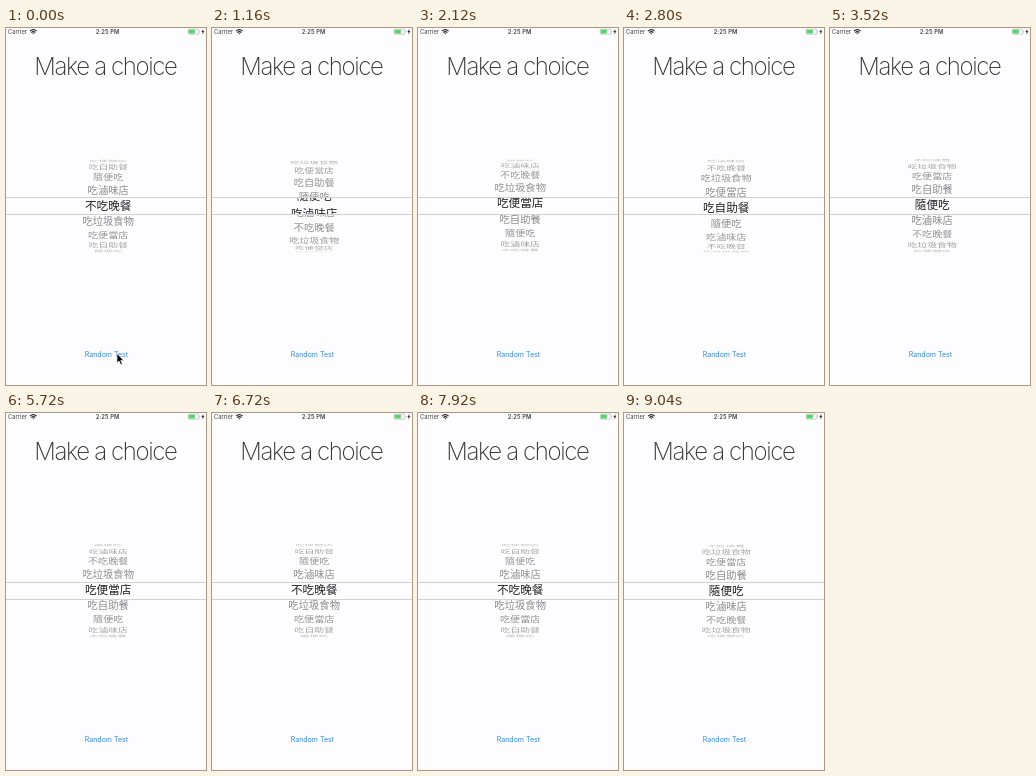
Animation, 200 px wide and 357 px high, one loop 9.6 s. Source, as an HTML page:

```html
<!DOCTYPE html>
<html lang="zh-Hant">
<head>
<meta charset="utf-8">
<title>Make a choice</title>
<style>
  html, body { margin: 0; width: 100%; height: 100%; overflow: hidden; background: #fdfcfe; }
  svg { display: block; width: 100vw; height: 100vh; }
  text { text-anchor: middle; font-family: Inter, sans-serif; }
  .row { font: 300 10.4px "Noto Sans CJK TC", "Noto Sans CJK", sans-serif; }
</style>
</head>
<body>
<svg viewBox="0 0 200 357">
  <defs>
    <clipPath id="outside"><path d="M0 131H200V169H0zM0 187H200V225H0z"/></clipPath>
    <clipPath id="inside"><path d="M0 170H200V186H0z"/></clipPath>
  </defs>

  <g fill="#444" font-size="5.8">
    <text x="11.5" y="6.2">Carrier</text>
    <text x="101.6" y="6.2" font-weight="600" letter-spacing=".1">2:25 PM</text>
  </g>
  <g fill="none" stroke="#222" stroke-width="1.1">
    <path d="M24 3.2Q27.3 0 30.6 3.2M25.3 4.6Q27.3 2.6 29.3 4.6"/>
    <path d="M26.3 5.2h2l-1 1.2z" fill="#222" stroke="none"/>
  </g>
  <rect x="182.2" y="1.2" width="10.8" height="5" rx="1" fill="none" stroke="#999" stroke-width=".5"/>
  <rect x="182.8" y="1.8" width="6" height="3.8" rx=".5" fill="#4cd964"/>
  <path d="M193.6 2.8v1.8q1-.9 0-1.8" fill="#999"/>
  <path d="M197.6 1l-2.3 3.1h1.4l-.6 2.5 2.4-3.3h-1.4z" fill="#222"/>

  <text x="99.4" y="46.5" font-size="24" font-weight="200" letter-spacing="-1.35" fill="#333">Make a choice</text>

  <g id="wheel" clip-path="url(#outside)"></g>
  <g id="lens" clip-path="url(#inside)" fill="#222"></g>
  <path d="M0 169.5H200M0 186.5H200" stroke="#d2d2d2"/>

  <text x="100.4" y="328.5" font-size="7" fill="#2b8af5">Random Test</text>
  <path id="cursor" d="M111 325.6v9.4l2.1-2 1.6 3.6 1.6-.7-1.6-3.5h2.9z" fill="#000" stroke="#fff" stroke-width=".6"/>
</svg>
<script>
const LOOP = 9600, CENTER_X = 102.2, CENTER_Y = 178;
const RADIUS = 46, STEP = 19.7 * Math.PI / 180, ZOOM = 1.12;
const START = 80, BRAKE = 8130, STOP = 8680, LAST_ROW = 82;
const choices = ["不吃晚餐", "吃垃圾食物", "吃便當店", "吃自助餐", "隨便吃", "吃滷味店"];
const cursor = document.getElementById("cursor");

function makeRows(id, reach) {
  const parent = document.getElementById(id);
  return Array.from({ length: 2 * reach + 1 }, (_, i) => {
    const node = document.createElementNS("http://www.w3.org/2000/svg", "text");
    node.setAttribute("class", "row");
    node.setAttribute("y", 3.9);
    parent.append(node);
    return { node, shift: i - reach };
  });
}

const wheel = makeRows("wheel", 5), lens = makeRows("lens", 1);

// Wheel position in rows: short ramp, one row per 100 ms, cubic stop.
function position(t) {
  const x = t - START, ramp = 46;
  if (x <= 0) return 0;
  if (x < ramp) return x * x / (200 * ramp);
  if (t < BRAKE) return (t - (t < 2800 ? 103 : 113)) / 100;
  const left = Math.max(0, (STOP - t) / (STOP - BRAKE));
  return LAST_ROW - (LAST_ROW - (BRAKE - 113) / 100) * left ** 3;
}

function place({ node, shift }, pos, zoom) {
  const index = Math.round(pos) + shift;
  const angle = (index - pos) * STEP, depth = Math.cos(angle);
  const y = CENTER_Y + RADIUS * zoom * Math.sin(angle);
  const width = zoom * (0.88 + 0.12 * depth), height = zoom * Math.max(depth, 0);
  node.textContent = choices[(index + 6) % 6];
  node.setAttribute("transform", `translate(${CENTER_X} ${y}) scale(${width} ${height})`);
  node.setAttribute("visibility", depth > 0.03 ? "visible" : "hidden");
  return depth;
}

function draw(now) {
  const t = now % LOOP, pos = position(t);
  for (const row of wheel) {
    const depth = place(row, pos, 1);
    row.node.setAttribute("opacity", 0.24 + 0.22 * Math.max(depth, 0));
  }
  for (const row of lens) place(row, pos, ZOOM);
  cursor.setAttribute("visibility", t < 40 ? "visible" : "hidden");
  requestAnimationFrame(draw);
}

requestAnimationFrame(draw);
</script>
</body>
</html>
```
